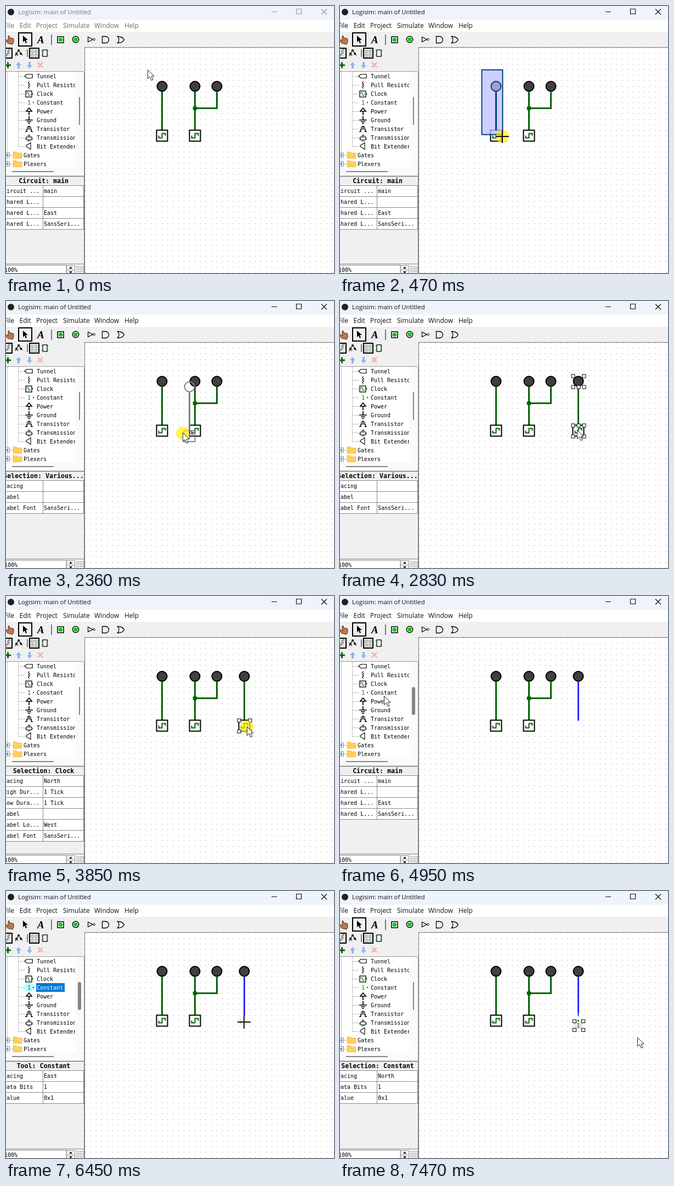
Write an HTML page that moves like this. It is 598 px wide and 487 px high and loops after 8 s.

```html
<!DOCTYPE html>
<html lang="en">
<head>
<meta charset="utf-8">
<title>Logic circuit editor</title>
<style>
html, body { margin: 0; width: 100%; height: 100%; overflow: hidden; background: #fff; }
svg { display: block; }
text { white-space: pre; }
.ui { font: 12px "Open Sans", sans-serif; }
.mono { font: 10px "DejaVu Sans Mono", monospace; }
.head { font: bold 11.6px "DejaVu Sans Mono", monospace; text-anchor: middle; }
</style>
</head>
<body>
<svg id="stage" width="598" height="487" viewBox="0 0 598 487"></svg>
<script>
const LOOP = 8000, TICK = 78.6;
const GREEN = '#006400', BLUE = '#2a2aff', SELECT = '#004080';

const rect = (x, y, w, h, fill, stroke = 'none', sw = 1) =>
  `<rect x="${x}" y="${y}" width="${w}" height="${h}" fill="${fill}" stroke="${stroke}" stroke-width="${sw}"/>`;
const path = (d, stroke, sw = 1, fill = 'none', extra = '') =>
  `<path d="${d}" stroke="${stroke}" stroke-width="${sw}" fill="${fill}" ${extra}/>`;
const circle = (x, y, r, fill, stroke = 'none', sw = 1) =>
  `<circle cx="${x}" cy="${y}" r="${r}" fill="${fill}" stroke="${stroke}" stroke-width="${sw}"/>`;
const text = (x, y, s, cls = 'mono', fill = '#000', extra = '') =>
  `<text x="${x}" y="${y}" class="${cls}" fill="${fill}" ${extra}>${s}</text>`;
const at = (x, y, body) => `<g transform="translate(${x} ${y})">${body}</g>`;

// ---- circuit parts, placed on the grid ----
const bulb = (x, y, stroke = '#000', fill = '#404040') => circle(x, y, 9, fill, stroke, 2);
const clock = (x, y, stroke = '#000', wave = GREEN, fill = '#fff') =>
  rect(x - 10, y - 10, 20, 20, fill, stroke, 2) +
  path(`M${x - 6} ${y}v4h6v-8h6v4`, wave, 2);
const wire = (d, color = GREEN) => path(d, color, 3);
const handles = list => list.map(([x, y]) => rect(x - 3, y - 3, 6, 6, '#fff', '#000')).join('');
const corners = (x, y, w, h) => [[x, y], [x + w, y], [x, y + h], [x + w, y + h]];
const pair = (x, y) =>
  wire(`M${x} ${y + 10}v71`) + bulb(x, y) + clock(x, y + 90);
const outline = (x, y, color, withClock = true) =>
  wire(`M${x} ${y + 10}v70`, color) + bulb(x, y, color, 'none') +
  (withClock ? clock(x, y + 90, color, color, 'none') : '');
const pairHandles = (x, y) => handles([
  ...corners(x - 9.5, y - 9.5, 20, 20), ...corners(x - 9.5, y + 80.5, 20, 20),
  [x + .5, y + 10.5], [x + .5, y + 80.5]]);

// ---- fixed window parts ----
function toolbar() {
  const hand = path('M3 68l-4-6 2-1 3 3 0-9q1-2 2 0l1 4 2-1 2 1 2 0 1 2v5l-2 4z', '#5a2d10', 1, '#b97a50');
  const pointer = path('M31 54v12l3-3 2 5 2-1-2-5 4 0z', 'none', 0, '#000');
  const letter = text(57, 68, 'A', '', '#000', 'style="font:italic bold 19px Liberation Serif,serif"');
  const pins = rect(94, 56, 11, 11, '#fff', '#000', 1.5) + circle(99.5, 61.5, 3.8, '#0c0') +
    circle(127, 61, 5.7, '#fff', '#000', 1.5) + circle(127, 61, 3.8, '#0c0');
  const gates = path('M149.500 56.500v9l9-4.500z', '#000', 1.2) + circle(160.500, 61, 1.8, '#fff', '#000') +
    path('M175.500 55.500h6a5.500 5.500 0 0 1 0 12h-6z', '#000', 1.3) +
    path('M203.500 55.500q9 0 12 6q-3 6-12 6q5-6 0-12z', '#000', 1.3);
  const views = rect(-9, 77, 20, 18, '#e4e4e4', '#000', 2) +
    path('M-1 92l6-7a3 3 0 0 1 3-5', '#999', 3) +
    path('M23 81l-4 6m4-6l4 5m-8 1l-2 4m2-4l3 4m5-5l3 4', '#000', 1.2) +
    circle(23, 81, 2, '#000') + circle(19, 87, 2, '#000') + circle(27, 87, 2, '#000') +
    rect(43, 77, 17, 18, '#e4e4e4', '#000', 2) +
    path('M46 80.500h4v4h-4zM53 80.500h4v4h-4zM46 88.500h4v4h-4zM53 88.500h4v4h-4zM48 85v3M55 85v3', '#999') +
    rect(67, 80, 8, 12, '#fff', '#000', 1.3) +
    path('M65 82h2M65 90h2M75 82h2M75 90h2', '#0a0', 2);
  const edit = path('M-2 108h11M3.500 102.500v11', '#0a640a', 3) +
    path('M23 102l5 6h-3v6h-4v-6h-3z', 'none', 0, '#91b5ee') +
    path('M43 114l5-6h-3v-6h-4v6h-3z', 'none', 0, '#91b5ee') +
    path('M58 103l9 9M67 103l-9 9', '#eeb9a8', 3);
  return hand + pointer + letter + path('M83 52v19', '#555', 1.5) + pins + gates +
    path('M39 79v14', '#555', 1.5) + views + edit;
}

const TREE = ['Tunnel', 'Pull Resistor', 'Clock', 'Constant', 'Power', 'Ground',
  'Transistor', 'Transmission Gate', 'Bit Extender'];
const ICONS = [
  path('M-8 0l4-3.500h10v7h-10z', '#000', 1.2),
  path('M0-7v2l-2 1 4 2-4 2 4 2-4 2 2 1v2', '#000'),
  rect(-6, -5, 11, 11, '#fff', '#000', 1.3) + path('M-4 0v-2h3v5h3v-2', GREEN) + circle(6, 0, 1.5, GREEN),
  text(-3, 4, '1', 'mono', '#087008') + circle(8, 0, 1.2, '#087008'),
  path('M0-6l5 6h-10zM0 0v7', '#000', 1.7),
  path('M0-7v7M-7 0h14M-4 3h8M-2 6h4', '#000', 1.7),
  path('M0-6v3M-4-3h8M-4 0h8M-4 0v5h-3M4 0v5h3', '#000', 1.6),
  path('M0-6v3M-3-3h6M-5-1h10v5h-10zM-7 2h2M5 2h2M-3 6h6', '#000', 1.2),
  path('M-5-1.500l8-5v12l-8-5z', '#000', 1.1)
];

function tree(picked) {
  let out = rect(0, 120, 127, 174, '#fff') +
    path('M22.500 120v137M2.500 120v174', '#888', 1, 'none', 'stroke-dasharray="1 1"');
  TREE.forEach((name, i) => {
    const y = 128 + i * 16, on = picked && name === 'Constant';
    out += path(`M23 ${y + .5}h11`, '#888', 1, 'none', 'stroke-dasharray="1 1"');
    if (on) out += `<ellipse cx="42" cy="${y}" rx="10" ry="8" fill="#b4ffff"/>` + rect(55, y - 8, 52, 16, '#0078d7');
    out += at(42, y, ICONS[i]) + text(56, y + 4, name, 'mono', on ? '#fff' : '#000');
  });
  ['Gates', 'Plexers'].forEach((name, i) => {
    const y = 272 + i * 16;
    out += rect(-1.5, y - 4, 8, 8, '#fff', '#888') + path(`M0 ${y}h5M2.500 ${y - 2.5}v5`, '#2050a0') +
      path(`M7 ${y + .5}h6`, '#888', 1, 'none', 'stroke-dasharray="1 1"') +
      path(`M13 ${y + 6}v-12h6l2 2h8v10z`, '#e5ad38', .6, '#ffcf59') + text(32, y + 4, name);
  });
  return `<svg x="0" y="120" width="126" height="174" viewBox="0 120 126 174">${out}</svg>`;
}

function frameWork() {
  const menus = [[-4, 'File'], [24.5, 'Edit'], [55, 'Project'], [104, 'Simulate'], [161, 'Window'], [216, 'Help']];
  let out = rect(0, 0, 598, 25, '#eff3fa') + rect(0, 25, 598, 22, '#fff') +
    rect(0, 47, 598, 440, '#f0f0f0') + circle(9, 11, 6, '#222') +
    rect(144, 76, 454, 411, '#fff') + rect(144, 76, 454, 411, 'url(#dots)') +
    path('M143.500 487V75.500H598', '#7a7a7a') + rect(0, 119, 142, 191, '#fafafa') +
    path('M0 119.500h142M142.500 120v190', '#999') + rect(11, 301, 76, 2, '#888') +
    path('M0 310.500h143', '#777', 1.5) + path('M0 470.500h143M142.500 310v177', '#888') +
    rect(-2, 473, 112, 16, '#fff', '#888') + text(-3, 485, '100%') +
    rect(110.5, 473.5, 15, 8, '#f4f4f4', '#999') + rect(110.5, 481.5, 15, 8, '#f4f4f4', '#999') +
    path('M115 479l3-3.500 3 3.500zM115 484l3 3.500 3-3.500z', 'none', 0, '#000') +
    rect(129, 474, 13, 13, 'url(#mini)');
  out += toolbar();
  return { out, menus };
}
const { out: fixed, menus } = frameWork();

function titleAndMenus(active) {
  const c = active ? '#111' : '#777';
  return text(22, 15, 'Logisim: main of Untitled', '', c, 'style="font:11.4px Open Sans,sans-serif"') +
    menus.map(([x, s]) => text(x, 40, s, 'ui', active ? '#111' : '#6d6d6d')).join('') +
    path('M484 10.500h10M529.500 5.500h9v9h-9zM575 5.500l10 10M585 5.500l-10 10', active ? '#111' : '#999', 1.2);
}

const FONT = 'SansSeri...';
const PANELS = {
  circuit: ['Circuit: main', ['Circuit ...', 'main'], ['Shared L...', ''], ['Shared L...', 'East'], ['Shared L...', FONT]],
  various: ['Selection: Various...', ['Facing', ''], ['Label', ''], ['Label Font', FONT]],
  clock: ['Selection: Clock', ['Facing', 'North'], ['High Dur...', '1 Tick'], ['Low Dura...', '1 Tick'],
    ['Label', ''], ['Label Lo...', 'West'], ['Label Font', FONT]],
  tool: ['Tool: Constant', ['Facing', 'East'], ['Data Bits', '1'], ['Value', '0x1']],
  east: ['Selection: Constant', ['Facing', 'East'], ['Data Bits', '1'], ['Value', '0x1']],
  north: ['Selection: Constant', ['Facing', 'North'], ['Data Bits', '1'], ['Value', '0x1']]
};
const PANEL_STEPS = [[0, 'circuit'], [1090, 'various'], [3370, 'circuit'], [3845, 'clock'],
  [4085, 'circuit'], [5655, 'tool'], [6600, 'east'], [7465, 'north']];

function panel(t) {
  const [title, ...rows] = PANELS[PANEL_STEPS.filter(s => s[0] <= t).pop()[1]];
  return text(68.5, 323, title, 'head') + rows.map(([key, value], i) => {
    const y = 327.5 + i * 20;
    return rect(-1, y, 142.5, 20, '#fff', '#888') + path(`M67.500 ${y}v20`, '#888') +
      text(-5, y + 13.5, key) + text(69, y + 13.5, value);
  }).join('');
}

// ---- pointer ----
const TRACK = [[0, 258, 117], [80, 258, 116], [390, 296, 220], [470, 296, 237], [864, 297, 263], [945, 296, 252],
  [1095, 307, 258], [1300, 307, 258], [1565, 290, 246], [1890, 289, 243], [2190, 286, 242], [2280, 286, 242],
  [2590, 418, 237], [2745, 431, 236], [2900, 432, 236], [3300, 465, 212], [3450, 465, 212], [3780, 452, 225],
  [3850, 439, 239], [4000, 436, 241], [4170, 430, 262], [4400, 405, 266], [4640, 250, 185], [4790, 128, 128],
  [4945, 81, 184], [5190, 66, 174], [5740, 66, 174], [6370, 426, 239], [6445, 434, 239], [6600, 434, 239],
  [6845, 542, 268], [8000, 542, 268]];
const PRESSES = [[75, 1090], [2350, 2740], [3300, 3380], [3845, 3930], [5575, 5660], [6520, 6600]];
const within = (t, a, b) => t >= a && t < b;

function pointerAt(t) {
  const i = Math.max(1, TRACK.findIndex(k => k[0] > t));
  const [a, b] = [TRACK[i - 1], TRACK[i]];
  const p = (t - a[0]) / (b[0] - a[0]);
  return [1, 2].map(n => Math.round(a[n] + (b[n] - a[n]) * p));
}

function pointer(t, x, y) {
  const cross = within(t, 75, 1090) || (within(t, 5700, 6600) && x > 144);
  const glow = PRESSES.some(([a, b]) => within(t, a, b)) ? circle(x, y, 12, '#fff000', 'none') : '';
  return (glow && `<g opacity=".68">${glow}</g>`) + (cross
    ? path(`M${x - 12} ${y}h24M${x} ${y - 12}v24`, '#111', 2)
    : path(`M${x + .5} ${y - .5}v16l3.700-3.500 3 6.500 2.800-1.300-3-6.200h5.200z`, '#222', 1, '#fff'));
}

function constant(t) {
  const [x, y] = t < 7465 ? [418, 228] : [426, 236];
  const dot = t < 7465 ? [434, 236] : [434, 236];
  return rect(x, y, 16, 16, '#e6e6e6') + text(x + 5, y + 12, '1', 'mono', '#333') +
    circle(...dot, 1.6, GREEN) + handles(corners(x + 1, y + 1, 16, 16));
}

function circuit(t, px, py) {
  let out = pair(284, 146) + pair(344, 146) + bulb(384, 146) +
    wire('M384 156v30h-40') + circle(344, 186, 4, GREEN);
  if (within(t, 75, 1090)) {
    const bottom = py - 4, right = px;
    out += rect(258, 116, Math.max(0, right - 258), Math.max(0, bottom - 116), 'rgba(192,192,255,.753)', SELECT, 2);
    if (right >= 294) {
      if (bottom >= 246) out += outline(284, 146, SELECT);
      else if (bottom >= 226) out += outline(284, 146, SELECT, false);
      else if (bottom >= 156) out += bulb(284, 146, SELECT, 'none');
    }
  }
  if (within(t, 1090, 1805)) out += pairHandles(284, 146);
  if (within(t, 1805, 2350)) out += pair(294, 156) + pairHandles(294, 156);
  if (within(t, 2350, 2740)) {
    const snap = v => Math.round(v / 10) * 10;
    out += outline(294 + snap(px - 286), 156 + snap(py - 242), '#808080');
  }
  if (within(t, 2740, 4085)) {
    out += pair(434, 146);
    if (t < 3370) out += pairHandles(434, 146);
    if (t >= 3845) out += handles(corners(424.5, 226.5, 20, 20));
  }
  if (t >= 4085) out += wire('M434 156v71', BLUE) + bulb(434, 146);
  if (within(t, 5700, 6600) && px > 400) out += text(424, 241, '1', 'mono', '#aaa');
  if (t >= 6600) out += constant(t);
  if (t >= 7465) out += wire('M434 222v6', '#5a80b0');
  return at(.5, .5, out);
}

const stage = document.getElementById('stage');
stage.innerHTML = `<defs>
  <pattern id="dots" x="144" y="76" width="10" height="10" patternUnits="userSpaceOnUse">${rect(0, 0, 1, 1, '#8c8c8c')}</pattern>
  <pattern id="mini" x="129" y="475" width="3" height="3" patternUnits="userSpaceOnUse">${rect(0, 0, 1, 1, '#222')}</pattern>
</defs>${fixed}<g id="live"></g>`;
const live = document.getElementById('live');

function render(t) {
  const [x, y] = pointerAt(t);
  const picked = within(t, 5655, 6600);
  const wide = within(t, 4780, 5425) || within(t, 5800, 6680);
  live.innerHTML = titleAndMenus(t >= 75) + (picked ? '' : rect(23, 49, 24, 24, 'none', '#000', 2)) +
    tree(picked) +
    (wide ? `<rect x="131" y="166" width="6" height="51" rx="3" fill="#858585"/>` : rect(133, 166, 2, 51, '#858585')) +
    panel(t) + circuit(t, x, y) + pointer(t, x, y);
}

let shown = -1;
function frame() {
  // The screen recording feel comes from whole ticks.
  const step = Math.floor((performance.now() % LOOP + 6) / TICK);
  if (step !== shown) render(Math.min(LOOP - 1, (shown = step) * TICK + 6));
  requestAnimationFrame(frame);
}
frame();
</script>
</body>
</html>
```
